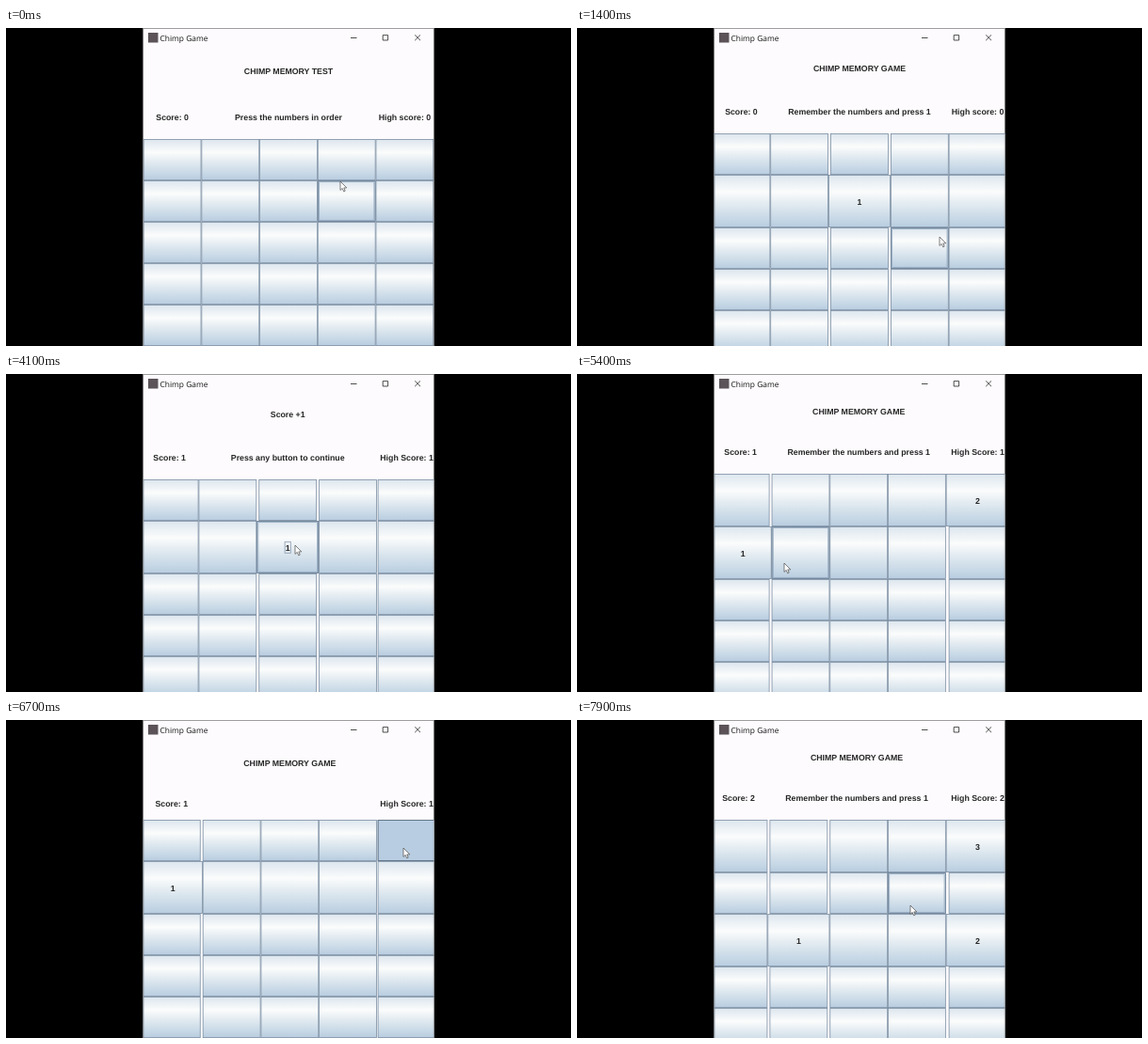
An HTML page for the animation above (8 s loop, 600x338 px).

```html
<!DOCTYPE html>
<html lang="en">
<head>
<meta charset="utf-8">
<title>Chimp Game</title>
<style>
  html, body { margin: 0; width: 100%; height: 100%; overflow: hidden; background: #000; }
  svg { display: block; width: 600px; height: 338px; }
  text { font: bold 8.77px "Liberation Sans", Arial, sans-serif; fill: #262626; text-anchor: middle; text-rendering: geometricPrecision; }
  .title { font: 8.4px "Open Sans", "Noto Sans", sans-serif; fill: #151515; text-anchor: start; }
  .btn { fill: url(#metal); stroke: #7c8fa3; stroke-width: .8; }
  .focus { fill: none; stroke: #8a9cb0; stroke-width: .8; }
  .ctl { fill: none; stroke: #222; stroke-width: .8; }
  .frame { fill: none; stroke: #777; stroke-width: .8; }
  #outer { fill: none; stroke: #73879c; stroke-width: .9; }
  #inner { fill: none; stroke: #94aac0; stroke-width: .9; }
  .down #outer { fill: #b8cde1; stroke: #5d7085; }
  .down #inner { stroke: none; }
</style>
</head>
<body>
<svg viewBox="0 0 600 338">
  <defs>
    <linearGradient id="metal" x2="0" y2="1">
      <stop offset="0" stop-color="#dce6ee"/>
      <stop offset=".32" stop-color="#fbfcfc"/>
      <stop offset=".6" stop-color="#dee8ef"/>
      <stop offset="1" stop-color="#b8cde0"/>
    </linearGradient>
    <clipPath id="win"><rect x="145.5" width="309" height="338"/></clipPath>
  </defs>
  <rect width="600" height="338"/>
  <g clip-path="url(#win)">
    <rect x="145" width="310" height="338" fill="#fdfbfd"/>
    <rect x="151" y="5" width="10.5" height="10.5" fill="#5b5358"/>
    <text class="title" x="163.5" y="13.6">Chimp Game</text>
    <path class="ctl" d="M366 10.5h6.5M400.2 7.6h5.4v5.4h-5.4zM434.2 7.4l5.8 5.8m0-5.8l-5.8 5.8"/>
    <g id="grid"></g>
    <g id="hover"><rect id="outer"/><rect id="inner"/></g>
    <g id="labels"></g>
    <path id="cursor" d="M0 0V9.4L2.2 7.4L3.7 10.8L5.2 10.1L3.8 6.9H6.8Z" fill="#fff" stroke="#555" stroke-width=".75"/>
    <path class="frame" d="M145.6 338V.4H454.4V338"/>
  </g>
</svg>
<script>
const $ = id => document.getElementById(id);
const LOOP = 8000, STEP = 100, N = 5;
const LEFT = 145.5, TOP = 21, CENTER = 300;
const CELL_W = 61.7, CELL_H = 44, DIGIT_W = 4.3, DIGIT_H = 12;
const TITLE_H = 50, INFO_H = 47, GRID_BOTTOM = 338;
const GAME = 'CHIMP MEMORY GAME', RECALL = 'Remember the numbers and press 1', NEXT = 'Press any button to continue';

// nums maps "row column" to the digit on that button; each scene but the last ends with a click
const scenes = [
  { end: 500, title: 'CHIMP MEMORY TEST', msg: 'Press the numbers in order', score: 0, high: 'High score: 0', nums: {} },
  { end: 2200, title: GAME, msg: RECALL, score: 0, high: 'High score: 0', nums: { 12: 1 } },
  { end: 4400, title: 'Score +1', msg: NEXT, score: 1, high: 'High Score: 1', nums: { 12: 1 }, focus: '12' },
  { end: 5800, title: GAME, msg: RECALL, score: 1, high: 'High Score: 1', nums: { 10: 1, '04': 2 } },
  { end: 6800, title: GAME, msg: '', score: 1, high: 'High Score: 1', nums: { 10: 1 } },
  { end: 7400, title: 'Score +1', msg: NEXT, score: 2, high: 'High Score: 2', nums: { 10: 1, '04': 2 }, focus: '04' },
  { end: Infinity, title: GAME, msg: RECALL, score: 2, high: 'High Score: 2', nums: { '04': 3, 21: 1, 24: 2 } }
];

// pointer moves: start, end, x, y; it rests in between
const moves = [
  [500, 1400, 385, 222], [1400, 2000, 303, 184], [2200, 2500, 396, 184], [2900, 4100, 307, 182],
  [4400, 5300, 220, 201], [5400, 5700, 182, 188], [5900, 6500, 422, 136], [7400, 7900, 354, 197]
];

const sum = list => list.reduce((a, b) => a + b, 0);
const edges = (from, sizes) => sizes.reduce((list, d) => [...list, list[list.length - 1] + d], [from]);

// Digits enlarge their row and column; the whole block stays centred, cut off at the top left.
function layout(s) {
  const ids = Object.keys(s.nums), each = [...Array(N).keys()];
  const widths = each.map(c => CELL_W + (ids.some(id => id[1] == c) ? DIGIT_W : 0));
  if (s.high.includes('Score')) widths[N - 1] += 1.6;
  const heights = each.map(r => CELL_H + (ids.some(id => id[0] == r) ? DIGIT_H : 0));
  const infoH = INFO_H - (s.msg ? 0 : DIGIT_H);
  const grown = sum(heights) - N * CELL_H + infoH - INFO_H;
  const xs = edges(CENTER - sum(widths) / 2, widths);
  const ys = edges(GRID_BOTTOM + grown / 2 - sum(heights), heights);

  const cells = each.flatMap(r => each.map(c => {
    const id = '' + r + c, w = s.nums[id] ? widths[c] : CELL_W;
    const l = xs[c] + (widths[c] - w) / 2, x = Math.max(LEFT, l);
    return { id, x, y: ys[r], w: l + w - x, h: heights[r] };
  }));
  const infoTop = ys[0] - infoH;
  return {
    cells, titleY: (TOP + infoTop) / 2, infoY: infoTop + infoH / 2,
    scoreX: (xs[0] + xs[1]) / 2, midX: (xs[1] + xs[N - 1]) / 2, highX: (xs[N - 1] + xs[N]) / 2
  };
}

const box = (b, d) => ({ x: b.x + d, y: b.y + d, width: b.w - 2 * d, height: b.h - 2 * d });
const set = (el, attrs) => { for (const k in attrs) el.setAttribute(k, attrs[k]); };
const rect = (cls, a) => `<rect class="${cls}" x="${a.x}" y="${a.y}" width="${a.width}" height="${a.height}"/>`;
const label = (x, y, str) => `<text x="${x}" y="${y + 3.1}">${str}</text>`;

function build(s) {
  const p = layout(s);
  let text = label(p.midX, p.titleY, s.title) + label(p.midX, p.infoY, s.msg) +
    label(p.scoreX, p.infoY, 'Score: ' + s.score) + label(p.highX, p.infoY, s.high);
  for (const b of p.cells.filter(b => s.nums[b.id])) {
    const x = b.x + b.w / 2, y = b.y + b.h / 2 + .5;
    text += label(x, y, s.nums[b.id]);
    if (s.focus === b.id) text += rect('focus', { x: x - 3.1, y: y - 6.2, width: 6.2, height: 12 });
  }
  $('grid').innerHTML = p.cells.map(b => rect('btn', box(b, .4))).join('');
  $('labels').innerHTML = text;
  return p.cells;
}

function pointer(t) {
  let x = 355, y = 163;
  for (const [from, to, toX, toY] of moves) {
    const u = Math.min(1, Math.max(0, (t - from) / (to - from))), k = u * u * (3 - 2 * u);
    x += (toX - x) * k;
    y += (toY - y) * k;
  }
  return [x, y];
}

let shown, cells;
function draw() {
  const t = Math.floor(performance.now() % LOOP / STEP) * STEP;
  const s = scenes.find(q => t < q.end);
  if (s !== shown) cells = build(shown = s);

  const [x, y] = pointer(t);
  $('cursor').setAttribute('transform', `translate(${x} ${y})`);
  const over = cells.find(b => x >= b.x && x < b.x + b.w && y >= b.y && y < b.y + b.h);
  $('hover').style.display = over ? '' : 'none';
  if (over) {
    set($('outer'), box(over, .45));
    set($('inner'), box(over, 1.6));
  }
  $('hover').setAttribute('class', t >= s.end - STEP ? 'down' : '');
  requestAnimationFrame(draw);
}
draw();
</script>
</body>
</html>
```
